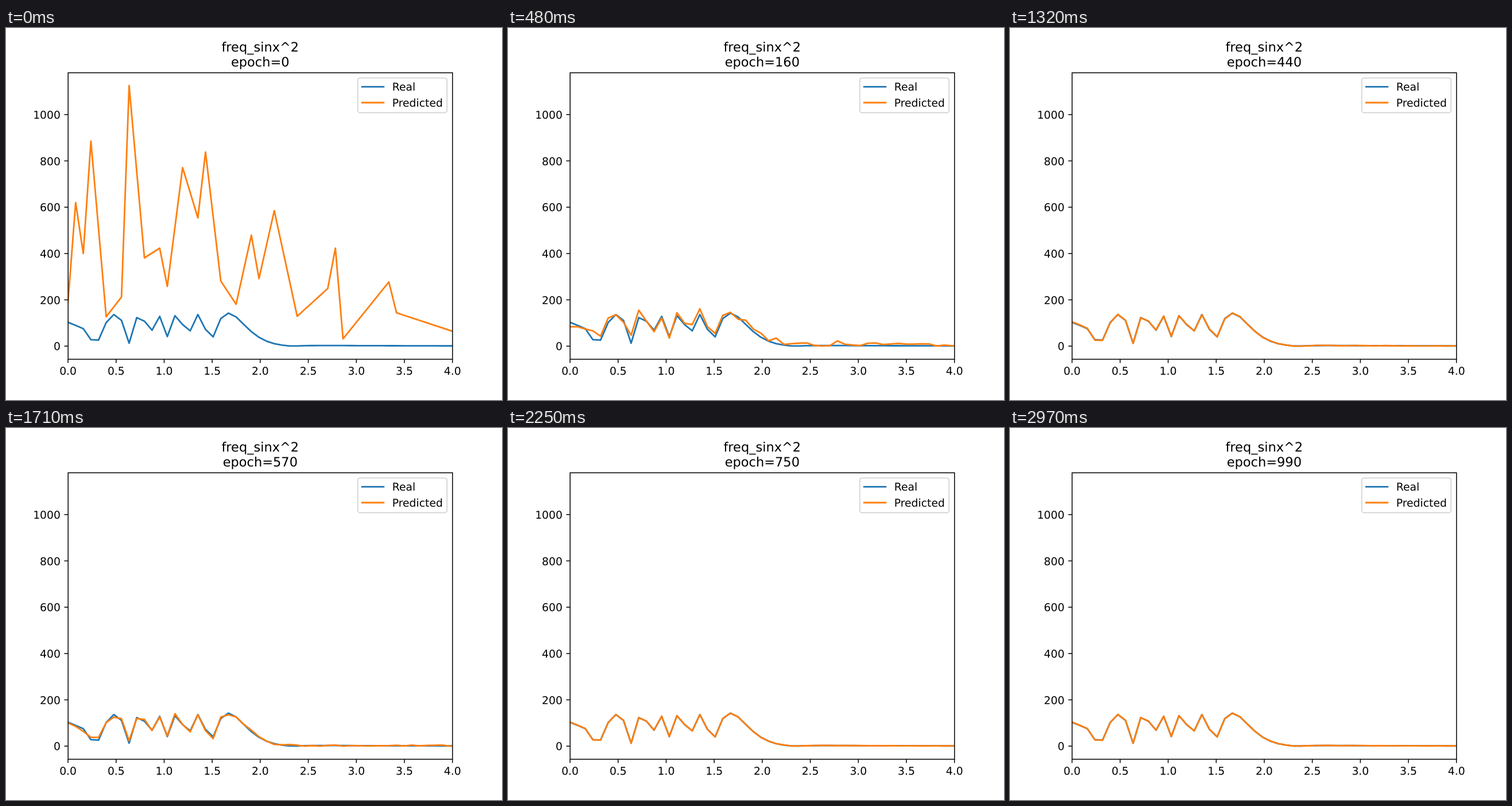
An HTML page that plays this animation: 864 px wide and 648 px high, repeating every 3000 ms.

```html
<!DOCTYPE html>
<html lang="en">
<head>
<meta charset="utf-8">
<title>Spectrum fit</title>
<style>
  html, body { margin: 0; width: 100%; height: 100%; overflow: hidden; background: #fff; }
  svg { display: block; width: 864px; height: 648px; }
  text { font: 18.75px "DejaVu Sans", sans-serif; fill: #000; text-rendering: geometricPrecision; }
  .title { font-size: 22.5px; text-anchor: middle; }
  .frame { fill: none; stroke: #000; stroke-width: 1.5; }
  .box { fill: #fff; stroke: #d6d6d6; stroke-width: 1.875; }
  .line { fill: none; stroke-width: 2.8125; stroke-linejoin: round; stroke-linecap: square; }
  .real { stroke: #1f77b4; }
  .pred { stroke: #ff7f0e; }
</style>
</head>
<body>
<svg viewBox="0 0 864 648">
  <clipPath id="plot"><rect x="108" y="77.76" width="669.6" height="498.96"/></clipPath>
  <g clip-path="url(#plot)">
    <path id="real" class="line real"/>
    <path id="pred" class="line pred"/>
  </g>
  <g id="axes"></g>
  <rect class="frame" x="108.2" y="78" width="669.6" height="499"/>
  <text class="title" x="442.8" y="41">freq_sinx^2</text>
  <text class="title" x="442.8" y="66.7" id="epoch">epoch=0</text>
  <rect class="box" x="612.8" y="87.1" width="155.4" height="60.4" rx="3.75"/>
  <path class="line real" d="M620.3 102.4h37.5"/>
  <path class="line pred" d="M620.3 130h37.5"/>
  <text x="672.8" y="108.9">Real</text>
  <text x="672.8" y="136.5">Predicted</text>
</svg>
<script>
const BINS = 52, SAMPLES = 1000, STEP_MS = 30, STEPS = 100;
const byId = id => document.getElementById(id);
const px = i => 108 + i * 13.308;
const py = v => 554.2 - v * 0.4034;

// Magnitude of one Fourier bin of sin(x^2), sampled over -2pi..2pi
function magnitude(k) {
  let re = 0, im = 0;
  for (let n = 0; n < SAMPLES; n++) {
    const x = 2 * Math.PI * (2 * n / (SAMPLES - 1) - 1);
    const turn = 2 * Math.PI * k * n / SAMPLES;
    re += Math.sin(x * x) * Math.cos(turn);
    im += Math.sin(x * x) * Math.sin(turn);
  }
  return Math.hypot(re, im);
}

// Main peaks and dips of the untrained spectrum: [bin, height]
const peaks = [[0, 190], [1, 620], [2, 400], [3, 885], [5, 127], [7, 212], [8, 1125],
  [10, 381], [12, 423], [13, 258], [15, 771], [17, 554], [18, 838], [20, 281], [22, 181],
  [24, 479], [25, 292], [27, 585], [30, 129], [34, 249], [35, 423], [36, 32], [42, 277],
  [43, 144], [51, 57]];

function untrained(i) {
  const n = Math.max(1, peaks.findIndex(p => p[0] >= i));
  const [x0, y0] = peaks[n - 1], [x1, y1] = peaks[n];
  return y0 + (y1 - y0) * (i - x0) / (x1 - x0);
}

function random(seed) {
  const n = Math.sin(seed * 127.1 + 11.7) * 43758.5453;
  return n - Math.floor(n);
}

const bins = Array.from({ length: BINS }, (_, i) => i);
const real = bins.map(magnitude);
const start = bins.map(untrained);

// The starting error dies away while a wobble swells, fades and briefly returns
function predicted(i, s) {
  const gap = (start[i] - real[i]) * Math.exp(-s / 4.5);
  const size = 10 * s * Math.exp(-s / 8) + 12 * Math.exp(-Math.abs(s - 57) / 2) + s / 100;
  const wobble = Math.sin(s * 0.8 + random(i) * 2 * Math.PI) - Math.sin(random(i) * 2 * Math.PI) * Math.exp(-s);
  return Math.abs(real[i] + gap + size * wobble * Math.exp(-i / 35));
}

const trace = f => "M" + bins.map(i => px(i).toFixed(2) + " " + py(f(i)).toFixed(2)).join("L");

function tick(path, x, y, anchor, label) {
  return `<path class="frame" d="${path}"/><text x="${x}" y="${y}" text-anchor="${anchor}">${label}</text>`;
}

let axes = "";
for (let i = 0; i <= 8; i++) {
  const x = 108.1 + i * 83.7;
  axes += tick(`M${x} 577v6.56`, x, 604, "middle", (i / 2).toFixed(1));
}
for (let v = 0; v <= 1000; v += 200) {
  const y = py(v);
  axes += tick(`M108 ${y}h-6.56`, 94.9, y + 7.1, "end", v);
}
byId("axes").innerHTML = axes;
byId("real").setAttribute("d", trace(i => real[i]));

let shown = -1;
function draw(now) {
  const s = Math.floor(now / STEP_MS + 1e-6) % STEPS;
  if (s !== shown) {
    shown = s;
    byId("pred").setAttribute("d", trace(i => predicted(i, s)));
    byId("epoch").textContent = "epoch=" + s * 10;
  }
}
function loop(now) {
  draw(now);
  requestAnimationFrame(loop);
}
draw(0);
requestAnimationFrame(loop);
</script>
</body>
</html>
```
